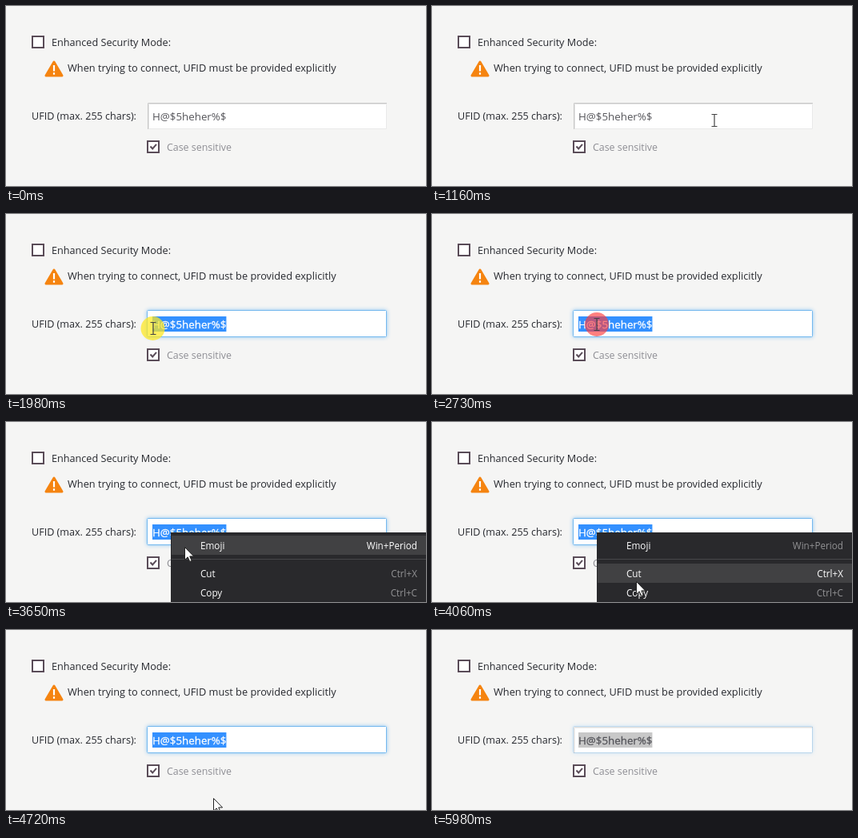
These frames come from a looping animation (525 px wide and 225 px high, 6.06 s). An HTML page:

```html
<!DOCTYPE html>
<html lang="en">
<head>
<meta charset="utf-8">
<title>Security settings</title>
<style>
  html, body { margin: 0; width: 100%; height: 100%; overflow: hidden; background: #f5f5f4; }
  svg { display: block; width: 525px; height: 225px; }
  text { font: 12.65px "Open Sans", "Noto Sans", sans-serif; fill: #26282e; white-space: pre; }
  .value { font-size: 13.33px; fill: #55555a; }
  .box { fill: #fff; stroke: #5a4c58; stroke-width: 2; }
  #focus { fill: #fff; stroke: #74b8ee; filter: drop-shadow(0 0 2.5px #8cc6f4); }
  #picked { stroke-width: .3; }
  #menu text { font-size: 11.7px; fill: #fff; }
  #menu .key { text-anchor: end; fill: #929294; }
  #menu rect { fill: none; }
  #menu .hover rect { fill: #414143; }
  #menu .hover .key { fill: #fff; }
</style>
</head>
<body>
<svg viewBox="0 0 525 225">
  <defs><clipPath id="clip"><rect id="clipBox" y="128" height="19"/></clipPath></defs>

  <rect class="box" x="33" y="38" width="14" height="14"/>
  <text x="57" y="50">Enhanced Security Mode:</text>

  <path d="M60 70L70 87H50Z" fill="#f58410" stroke="#f58410" stroke-width="3" stroke-linejoin="round"/>
  <path d="M60 74V81.5M60 83.2v2.6" stroke="#fff" stroke-width="2.2"/>
  <text x="77" y="82" style="font-size:12.76px">When trying to connect, UFID must be provided explicitly</text>

  <text x="32" y="142" style="font-size:12.58px">UFID (max. 255 chars):</text>
  <rect x="177" y="121" width="299" height="33" fill="#fff"/>
  <path d="M177.5 153.5H475.5V121" fill="none" stroke="#e9e9e9"/>
  <path d="M177.5 154V121.5H476" fill="none" stroke="#c8c8c8"/>
  <path d="M178.5 153V122.5H475" fill="none" stroke="#e4e4e4"/>
  <rect id="focus" x="176.5" y="120.5" width="299" height="33" rx="1"/>
  <text id="value" class="value" x="183" y="143">H@$5heher%$</text>
  <g clip-path="url(#clip)">
    <rect id="selection" x="183" y="128" width="100" height="19"/>
    <text id="picked" class="value" x="183" y="143">H@$5heher%$</text>
  </g>

  <rect class="box" x="177" y="169" width="14" height="14"/>
  <path d="M180.5 175.5l2.7 3l4.8-5.6" fill="none" stroke="#5a4c58" stroke-width="2"/>
  <text x="201" y="181" style="font-size:12.4px;fill:#8e8e94">Case sensitive</text>

  <g id="menu">
    <path d="M206 138H525V225H206Z" fill="#29292c"/>
    <path d="M207 171.5H525" stroke="#48484b"/>
  </g>

  <circle id="press" r="15"/>
  <g id="cursor">
    <path id="arrow" d="M.5.5V16.2L4.2 12.8L6.8 18.5L9.2 17.4L6.7 11.9H11.6Z" fill="#fff" stroke="#222"/>
    <path id="beam" d="M-3.5-7.5H3.5M0-7.5V7.5M-3.5 7.5H3.5" fill="none" stroke="#444" stroke-width="1.2"/>
  </g>
</svg>
<script>
const LOOP = 6060, STEP = 81.5;
const $ = id => document.getElementById(id);
const set = (id, attrs) => { for (const k in attrs) $(id).setAttribute(k, attrs[k]); };
const show = (id, on) => $(id).style.display = on ? '' : 'none';
const within = (t, a, b) => t >= a && t < b;

// [start time, steps, evenly spaced points]
const moves = [
  [500, 6, [[482, 206], [376, 142]]],
  [1160, 8, [[376, 142], [330, 143], [290, 143], [275, 143], [216, 143]]],
  [1820, 8, [[216, 143], [190, 143], [177, 143], [186, 142], [209, 140]]],
  [2480, 1, [[209, 140], [206, 138]]],
  [3650, 8, [[206, 138], [239, 174], [249, 189], [255, 199], [259, 210]]],
  [5230, 3, [[259, 210], [312, 227]]]
];

// [label, shortcut, top]
const items = [['Emoji', 'Win+Period', 142], ['Cut', 'Ctrl+X', 177], ['Copy', 'Ctrl+C', 201]]
  .map(([label, key, top]) => {
    const g = document.createElementNS('http://www.w3.org/2000/svg', 'g');
    g.innerHTML = `<rect x="207" y="${top}" width="318" height="24"/>
      <text x="243" y="${top + 17}">${label}</text>
      <text class="key" x="514" y="${top + 17}">${key}</text>`;
    $('menu').append(g);
    return { g, top };
  });

function pointer(t) {
  const [start, steps, pts] = moves.findLast(m => t >= m[0]) || moves[0];
  const step = Math.min(steps, 1 + Math.floor((t - start + 8) / STEP));
  const pos = Math.max(0, step / steps) * (pts.length - 1);
  const i = Math.min(Math.floor(pos), pts.length - 2), f = pos - i;
  return pts[i].map((v, k) => v + (pts[i + 1][k] - v) * f);
}

// Nearest gap between characters
function caret(x) {
  const text = $('value'), n = text.getNumberOfChars();
  const gaps = [text.getEndPositionOfChar(n - 1).x];
  for (let i = 0; i < n; i++) gaps.push(text.getStartPositionOfChar(i).x);
  return gaps.reduce((a, b) => Math.abs(b - x) < Math.abs(a - x) ? b : a);
}

function draw(t) {
  const [x, y] = pointer(t);
  const menuOpen = within(t, 2980, 4720), blurred = t >= 5900;

  const end = caret(999);
  const left = t < 1490 ? end : caret(t < 2070 ? x : 0);
  set('clipBox', { x: left, width: end - left });
  set('selection', { fill: blurred ? '#c8c8c8' : '#3390ff' });
  const ink = blurred ? '#55555a' : '#fff';
  set('picked', { style: `fill:${ink};stroke:${ink}` });
  set('focus', { opacity: t < 1490 ? 0 : t < 5900 ? 1 : t < 5980 ? 0.7 : 0.4 });

  show('menu', menuOpen);
  for (const { g, top } of items)
    g.classList.toggle('hover', y >= top && y < top + 24);

  const red = within(t, 2730, 2980);
  show('press', red || within(t, 1490, 2150) || within(t, 4310, 4390));
  set('press', { cx: x, cy: y, fill: red ? '#ff3c3c' : '#ffe81e', opacity: red ? 0.65 : 0.72 });

  const overField = !menuOpen && x < 476 && y > 120 && y < 154;
  show('cursor', within(t, 500, 5390));
  set('cursor', { transform: `translate(${Math.round(x)} ${Math.round(y)})` });
  show('arrow', !overField);
  show('beam', overField);
}

const begin = performance.now();
function tick() {
  draw((performance.now() - begin) % LOOP);
  requestAnimationFrame(tick);
}
tick();
</script>
</body>
</html>
```
